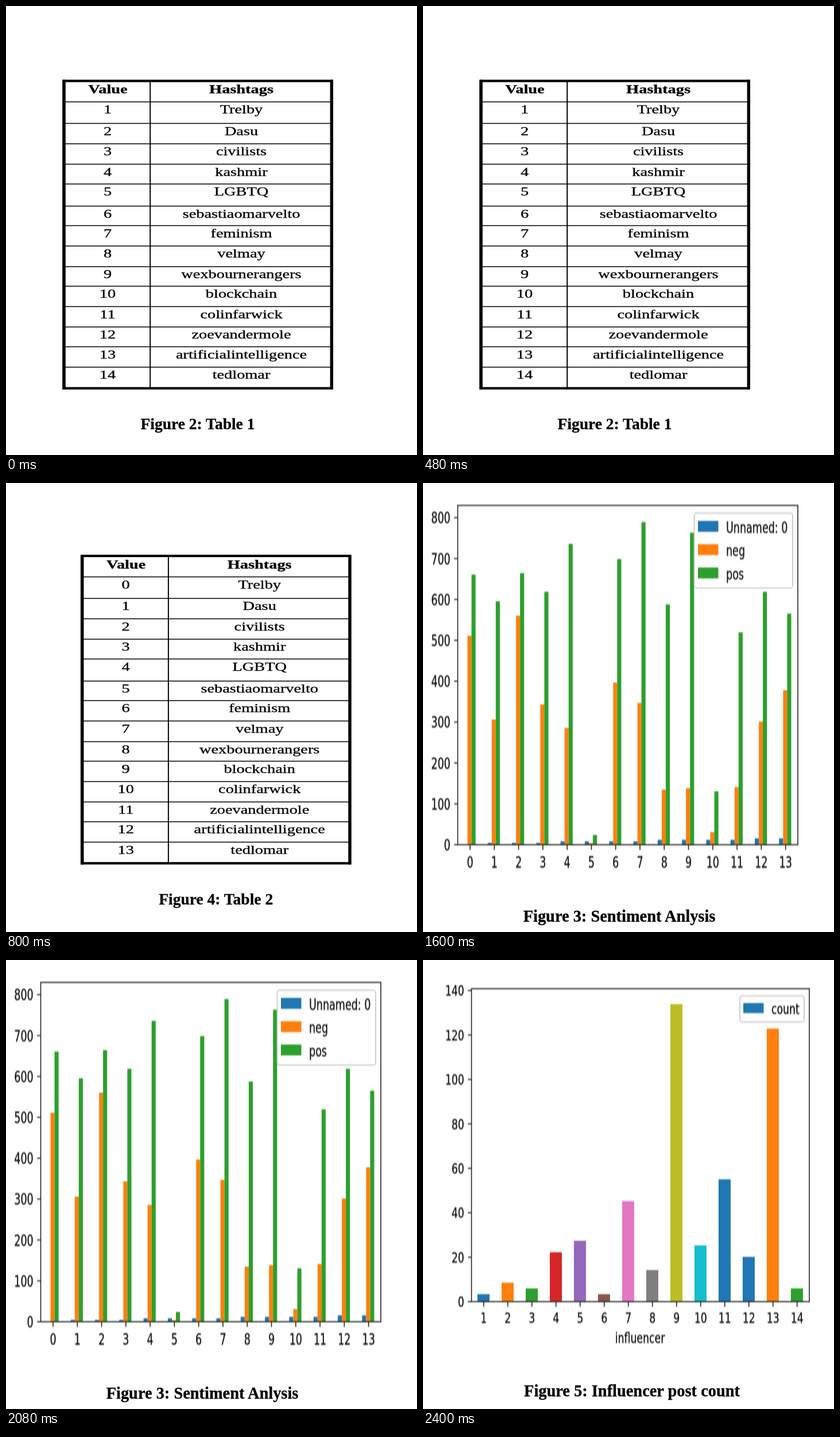
An HTML page for the animation above (3.2 s loop, 716 by 782 pixels).

```html
<!DOCTYPE html>
<html lang="en">
<head>
<meta charset="utf-8">
<title>Hashtag tables and charts</title>
<style>
html, body { margin: 0; width: 100%; height: 100%; overflow: hidden; background: #fff; }
svg { display: block; width: 100%; height: 100%; }
.serif { font-family: "Liberation Serif", "Times New Roman", serif; fill: #000; stroke: #000; stroke-width: 0.3; }
.sans { font-family: "DejaVu Sans", sans-serif; fill: #111; stroke: #111; stroke-width: 0.4; }
</style>
</head>
<body>
<svg id="stage" viewBox="0 0 716 782" xmlns="http://www.w3.org/2000/svg">
  <filter id="soft" filterUnits="userSpaceOnUse" x="0" y="0" width="716" height="782" color-interpolation-filters="sRGB">
    <feGaussianBlur stdDeviation="0.6 0.8"/>
  </filter>
</svg>
<script>
const NS = "http://www.w3.org/2000/svg";
const stage = document.getElementById("stage");
const STEP = 800;
const [BLUE, ORANGE, GREEN, RED, PURPLE, BROWN, PINK, GRAY, OLIVE, CYAN] =
  ["#1f77b4", "#ff7f0e", "#2ca02c", "#d62728", "#9467bd", "#8c564b", "#e377c2", "#7f7f7f", "#bcbd22", "#17becf"];
const AXIS = "#222";

function add(parent, tag, attrs, text) {
  const el = document.createElementNS(NS, tag);
  for (const key in attrs) el.setAttribute(key, attrs[key]);
  if (text !== undefined) el.textContent = text;
  parent.appendChild(el);
  return el;
}

const box = (g, x1, y1, x2, y2, fill) =>
  add(g, "rect", { x: x1, y: y1, width: x2 - x1, height: y2 - y1, fill });

const line = (g, x1, y1, x2, y2, stroke, width) =>
  add(g, "line", { x1, y1, x2, y2, stroke, "stroke-width": width });

// font: { cls, size, wide, weight }, where wide is the horizontal scale of the face
function label(g, text, x, y, font, anchor = "middle") {
  add(g, "text", {
    class: font.cls, "font-size": font.size, "font-weight": font.weight || 400,
    "text-anchor": anchor, transform: `translate(${x} ${y}) scale(${font.wide || 1} 1)`
  }, text);
}

const caption = (g, text, x, y, size) =>
  label(g, text, x, y, { cls: "serif", size, weight: 700 });

const tags = ["Trelby", "Dasu", "civilists", "kashmir", "LGBTQ", "sebastiaomarvelto", "feminism",
  "velmay", "wexbournerangers", "blockchain", "colinfarwick", "zoevandermole",
  "artificialintelligence", "tedlomar"];
const rules = [167, 204.5, 240, 275.5, 310, 348.5, 382.5, 418, 454, 488, 523.5, 559, 593.5, 629];

function table(first, dx, dy, title) {
  const g = add(stage, "g", { transform: `translate(${dx} ${dy})` });
  const cell = { cls: "serif", size: 21, wide: 1.35 };
  const head = { ...cell, weight: 700 };
  add(g, "rect", { x: 101, y: 130.5, width: 466.3, height: 535.3, fill: "none", stroke: "#000", "stroke-width": 4.2 });
  line(g, 101, 128.4, 101, 667.9, "#000", 5.6);
  line(g, 567.3, 128.4, 567.3, 667.9, "#000", 5.4);
  line(g, 251.2, 130, 251.2, 666, "#000", 2);
  label(g, "Value", 177.5, 152, head);
  label(g, "Hashtags", 410, 152, head);
  rules.forEach((y, i) => {
    line(g, 101, y, 567, y, "#000", 1.7);
    label(g, first + i, 177, y + 20.2, cell);
    label(g, tags[i], 410, y + 20.2, cell);
  });
  caption(g, title, 334, 737, 27.5);
  return g;
}

// A scene with a softened plot layer, so that the caption stays sharp
function chart(title, x, y) {
  const scene = add(stage, "g", {});
  const plot = add(scene, "g", { filter: "url(#soft)" });
  caption(scene, title, x, y, 28.4);
  return { scene, plot };
}

function frame(g, x1, y1, x2, y2) {
  line(g, x1, y1, x1, y2, AXIS, 1.6);
  line(g, x2, y1, x2, y2, AXIS, 1.6);
  line(g, x1 - 0.8, y1, x2 + 0.8, y1, AXIS, 2);
  line(g, x1 - 0.8, y2, x2 + 0.8, y2, AXIS, 2);
}

function yTicks(g, font, left, zero, gap, step, count) {
  for (let i = 0; i < count; i++) {
    const y = zero - gap * i;
    line(g, left - 6.2, y, left, y, AXIS, 2);
    label(g, i * step, left - 12.8, y + font.size * 0.37, font, "end");
  }
}

function xTicks(g, font, x0, pitch, base, first, textY) {
  for (let i = 0; i < 14; i++) {
    const x = x0 + pitch * i;
    line(g, x, base, x, base + 9, AXIS, 1.6);
    label(g, first + i, x, textY, font);
  }
}

function legend(g, x1, y1, x2, y2) {
  add(g, "rect", {
    x: x1, y: y1, width: x2 - x1, height: y2 - y1, rx: 4, ry: 5,
    fill: "#fff", "fill-opacity": 0.85, stroke: "#c8c8c8", "stroke-width": 1.8
  });
}

function sentiment() {
  const { scene, plot: g } = chart("Figure 3: Sentiment Anlysis", 342, 763.5);
  const font = { cls: "sans", size: 27.2, wide: 0.645 };
  const base = 630;
  const neg = [266, 412, 231, 385.5, 426.5, 627, 347.5, 383, 534, 531.5, 608, 529.5, 415.5, 361];
  const pos = [159.5, 206, 157, 189.5, 106, 613, 132.5, 68, 211.5, 86.5, 537, 260, 189.5, 227.5];
  for (let i = 0; i < 14; i++) {
    const x = 81 + 42.3 * i;
    if (i) box(g, x - 10.6, 626.6 - 2.6 * Math.floor(i / 4), x - 3.5, base, BLUE);
    box(g, x - 3.5, neg[i], x + 3.5, base, ORANGE);
    box(g, x + 3.5, pos[i], x + 10.6, base, GREEN);
  }
  yTicks(g, font, 60.5, base, 71.2, 100, 9);
  xTicks(g, font, 82, 42.28, base, 0, 670);
  frame(g, 60.5, 39, 653, base);
  legend(g, 472.5, 52.5, 644, 183);
  [["Unnamed: 0", BLUE], ["neg", ORANGE], ["pos", GREEN]].forEach(([name, color], i) => {
    const y = 66 + 40.6 * i;
    box(g, 479, y, 514.5, y + 19, color);
    label(g, name, 528, y + 20.5, font, "start");
  });
  return scene;
}

function posts() {
  const { scene, plot: g } = chart("Figure 5: Influencer post count", 364, 760);
  const font = { cls: "sans", size: 25.1, wide: 0.69 };
  const base = 595;
  const tops = [582, 562, 572, 509, 489, 582, 420, 540, 77, 497, 382, 517, 119.5, 572];
  const colors = [BLUE, ORANGE, GREEN, RED, PURPLE, BROWN, PINK, GRAY, OLIVE, CYAN, BLUE, BLUE, ORANGE, GREEN];
  tops.forEach((y, i) => {
    const x = 105.4 + 42 * i;
    box(g, x - 10.5, y, x + 10.5, base, colors[i]);
  });
  yTicks(g, font, 84.5, base, 77.4, 20, 8);
  xTicks(g, font, 105.7, 42, base, 1, 632);
  frame(g, 84.5, 50, 673, base);
  legend(g, 552, 62.5, 664, 108);
  box(g, 558, 75, 593.5, 92.5, BLUE);
  label(g, "count", 607, 94, font, "start");
  label(g, "influencer", 378, 667, font);
  return scene;
}

const scenes = [
  table(1, 0, 0, "Figure 2: Table 1"),
  table(0, 31.7, -3.5, "Figure 4: Table 2"),
  sentiment(),
  posts()
];

function render(t) {
  const now = Math.floor(t / STEP) % scenes.length;
  scenes.forEach((g, i) => g.setAttribute("display", i === now ? "inline" : "none"));
}

const start = performance.now();
function tick() {
  render(performance.now() - start);
  requestAnimationFrame(tick);
}
tick();
</script>
</body>
</html>
```
